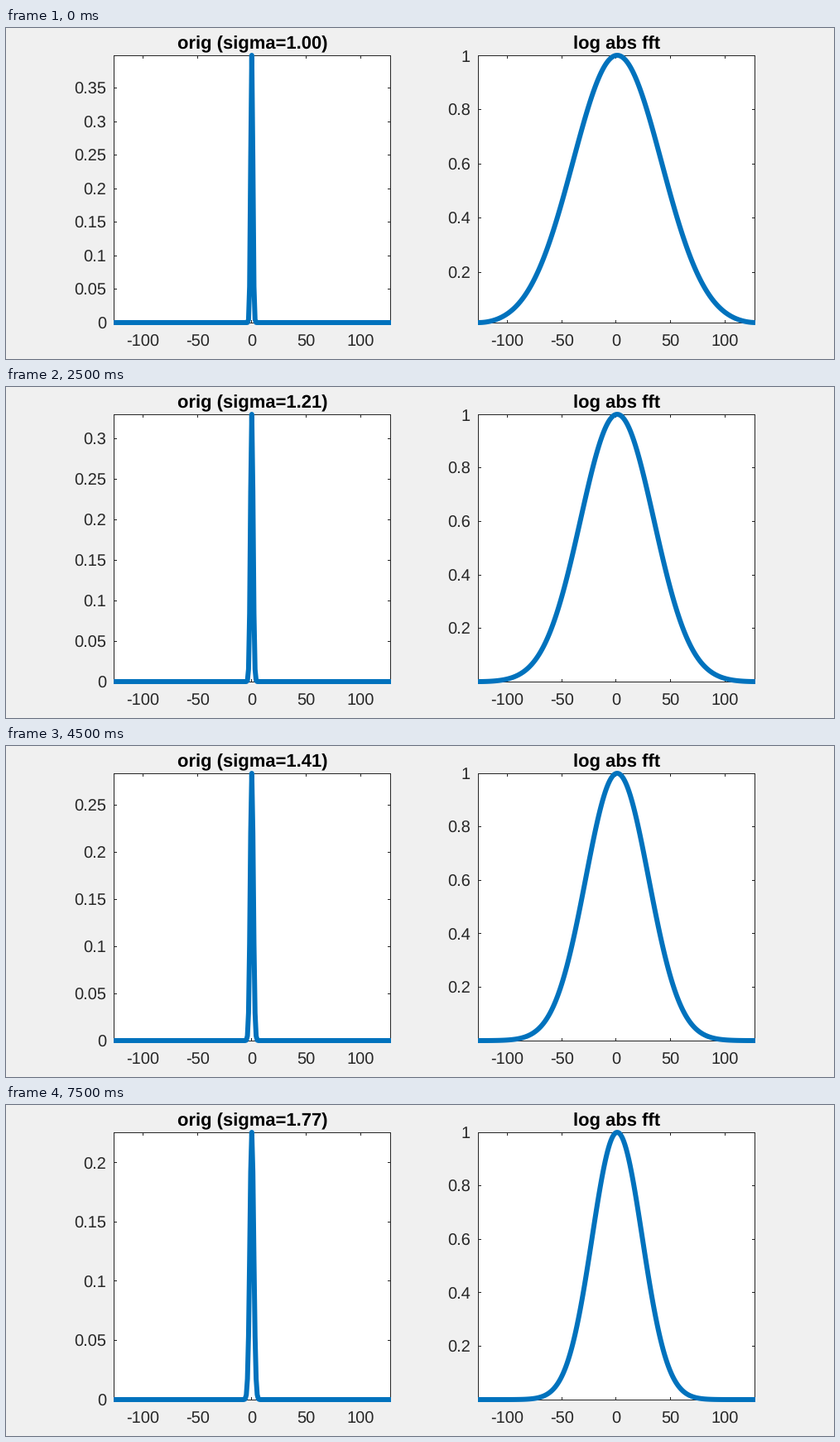
Animation, 1000 px wide and 400 px high, one loop 8000 ms. Source, as a matplotlib script:

```python
import numpy as np
import matplotlib.pyplot as plt
from matplotlib.animation import FuncAnimation

plt.rcParams["font.family"] = "Liberation Sans"
plt.rcParams["text.hinting"] = "none"
plt.rcParams["path.simplify"] = False

W, H, DPI = 1000, 400, 100
PX = 72 / DPI                      # points per pixel
FRAMES, INTERVAL = 16, 500
GROWTH = 0.03795                   # log growth of sigma per frame

TOP, BOTTOM, WIDTH = 33, 356, 335
LEFT_A, LEFT_B = 130, 570
TICK = 3.5
INK, BLUE = "#262626", "#0072BD"

x = np.arange(-127, 129)

fig = plt.figure(figsize=(W / DPI, H / DPI), dpi=DPI, facecolor="#F0F0F0")
ax = fig.add_axes([0, 0, 1, 1])
ax.set_xlim(0, W)
ax.set_ylim(H, 0)
ax.axis("off")


def pixel(v):
    """Centre of the pixel that holds v."""
    return np.floor(v) + .5


def segment(xs, ys):
    return ax.plot(xs, ys, color=INK, lw=PX, solid_capstyle="butt",
                   solid_joinstyle="miter", snap=False, zorder=2)[0]


def label(px, py, text, ha):
    return ax.text(px, py, text, ha=ha, va="baseline", color=INK,
                   fontsize=20 * PX, zorder=4)


def title(left, text):
    return ax.text(left + WIDTH / 2, 25, text, ha="center", va="baseline",
                   color="black", weight="bold", fontsize=22 * PX, zorder=4)


def to_px(v, left):
    return left + (v - x[0]) / (x[-1] - x[0]) * WIDTH


def panel(left):
    """White box, x ticks and x labels; returns the curve line."""
    l, r, t, b = left + .5, left + WIDTH - .5, TOP + .5, BOTTOM + .5
    ax.fill([l, r, r, l], [t, t, b, b], color="white", lw=0, zorder=1)
    segment([l, r, r, l, l, r], [t, t, b, b, t, t])
    for v in range(-100, 101, 50):
        px = to_px(v, left)
        segment([pixel(px)] * 2, [b, b - TICK])
        segment([pixel(px)] * 2, [t, t + TICK])
        label(px, 385, str(v), "center")
    return ax.plot([], [], color=BLUE, lw=6 * PX, solid_capstyle="butt",
                   solid_joinstyle="round", zorder=3)[0]


def show_curve(line, left, y, step):
    """Fit the curve tightly to its box and return its y ticks."""
    lo, hi = y.min(), y.max()

    def to_py(v):
        return BOTTOM - (v - lo) / (hi - lo) * (BOTTOM - TOP)

    line.set_data(to_px(x, left), to_py(y))
    l, r = left + .5, left + WIDTH - .5
    made = []
    for k in range(int(hi / step + 1e-6) + 1):
        v = k * step
        if v < lo:
            continue
        py = to_py(v)
        made += [segment([l, l + TICK], [pixel(py)] * 2),
                 segment([r, r - TICK], [pixel(py)] * 2),
                 label(left - 9, py + 7.5, f"{v:g}", "right")]
    return made


line_a, line_b = panel(LEFT_A), panel(LEFT_B)
title_a = title(LEFT_A, "")
title(LEFT_B, "log abs fft")
ticks = []


def update(i):
    while ticks:
        ticks.pop().remove()
    sigma = np.exp(GROWTH * i)
    bell = np.exp(-x**2 / (2 * sigma**2)) / (sigma * np.sqrt(2 * np.pi))
    spectrum = np.abs(np.fft.fftshift(np.fft.fft(bell)))
    title_a.set_text(f"orig (sigma={sigma:.2f})")
    ticks.extend(show_curve(line_a, LEFT_A, bell, 0.05))
    ticks.extend(show_curve(line_b, LEFT_B, spectrum, 0.2))
    return []


anim = FuncAnimation(fig, update, frames=FRAMES, interval=INTERVAL,
                     repeat=True, repeat_delay=0, blit=False)
plt.show()
```
